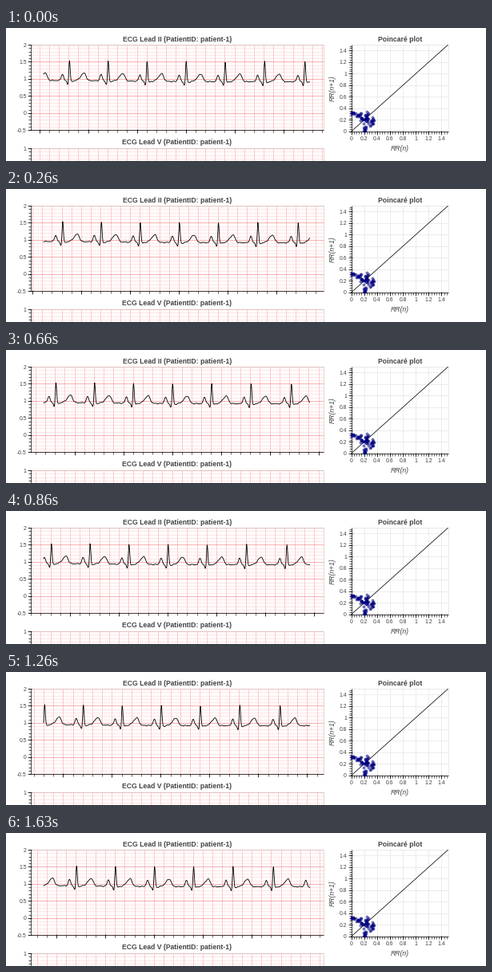
Recreate the animation shown at these times as a matplotlib script. Size 600x167 px, loop 1760 ms.

```python
import matplotlib.pyplot as plt
import numpy as np
from matplotlib.animation import FuncAnimation
from matplotlib.collections import LineCollection

W, H, DPI = 600, 167, 100
LOOP_MS, TICK_MS = 1760, 10
STEP_TIMES = [30, 130, 260, 360, 460, 660, 730, 860,
              1030, 1160, 1260, 1460, 1560, 1630]
STEP_PX = 2.82

LEFT, RIGHT, TOP, BOTTOM = 30.5, 396.5, 21, 128.3
LOWER_TOP = 151
MV = 42.9            # pixels per millivolt
SECOND = 61.0        # pixels per second
GRID_PHASE = 41.5
TRACE_START, TRACE_END = 47, 380
R_PEAKS = [-18.5, 30.5, 79.3, 127.7, 176.3, 225.2, 274, 323.3, 373.7, 423]

PT = 72 / DPI
INK = "#444444"

plt.rcParams["font.family"] = "Liberation Sans"
fig = plt.figure(figsize=(W / DPI, H / DPI), dpi=DPI, facecolor="white")
ax = fig.add_axes([0, 0, 1, 1])
ax.set_xlim(0, W)
ax.set_ylim(H, 0)
ax.axis("off")


def text(x, y, s, px=6.9, **kw):
    kw = {"color": INK, "ha": "center", "va": "baseline", **kw}
    ax.text(x, y, s, fontsize=px * PT, **kw)


def lines(segments, color, width, z=1, alpha=1):
    group = LineCollection(segments, colors=color, linewidths=width * PT,
                           alpha=alpha, zorder=z)
    ax.add_collection(group, autolim=False)
    return group


def hseg(ys, x0, x1):
    return [[(x0, y), (x1, y)] for y in ys]


def vseg(xs, y0, y1):
    return [[(x, y0), (x, y1)] for x in xs]


def title(x, y, s):
    text(x, y, s, 8.62, weight="bold")


# ECG panels
def ecg_panel(top, bottom, high):
    majors = np.arange(top, bottom + 1, MV / 2)
    minors = np.arange(top, bottom + 1, MV / 10)
    lines(hseg(minors, LEFT, RIGHT), "#ff0000", 0.65, alpha=0.12)
    lines(hseg(majors, LEFT, RIGHT), "#ee4444", 0.7, alpha=0.45)
    lines(hseg(minors, LEFT - 2.6, LEFT), "black", 0.65, 3)
    lines(hseg(majors, LEFT - 4, LEFT + 1.3), "black", 0.7, 3)
    lines([[(LEFT, top), (LEFT, bottom)]], "black", 0.7, 3)
    lines([[(LEFT, top), (RIGHT, top)], [(RIGHT, top), (RIGHT, bottom)]],
          "#d8c8c8", 0.7, 2)
    for i, y in enumerate(majors):
        if y < H - 2:
            text(25.8, y + 2.5, f"{high - i / 2:g}", ha="right")


ecg_panel(TOP, BOTTOM, 2)
ecg_panel(LOWER_TOP, LOWER_TOP + MV * 2.5, 1)
lines([[(LEFT, BOTTOM), (RIGHT, BOTTOM)]], "black", 0.7, 3)
title(213.7, 16.6, "ECG Lead II (PatientID: patient-1)")
title(213.7, 145.8, "ECG Lead V (PatientID: patient-1)")

minor_grid = lines([], "#ff0000", 0.5, alpha=0.07)
major_grid = lines([], "#ee4444", 0.65, alpha=0.36)
minor_ticks = lines([], "black", 0.6, 3)
major_ticks = lines([], "black", 0.7, 3)
trace, = ax.plot([], [], color="black", lw=0.85 * PT, zorder=4,
                 solid_joinstyle="round")


def bump(x, centre, rise, fall, height):
    width = np.where(x < centre, rise, fall)
    return height * np.exp(-((x - centre) / width) ** 2 / 2)


def lead_two(x):
    y = 66.6 + 0.8 * np.tanh((x - 150) / 80)
    y = y + 0.3 * np.sin(x * 0.83) + 0.25 * np.sin(x * 1.37 + 1)
    for r in R_PEAKS:
        d = x - r
        y -= bump(d, -8.8, 1.5, 1.4, 8)
        y += bump(d, -2.1, 1.0, 0.8, 5)
        y -= bump(d, 0, 0.75, 0.85, 25.5)
        y += bump(d, 3, 1.5, 2, 1)
        y -= bump(d, 18.5, 4.2, 2.3, 9.5)
    return y


def scrolled(spacing, shift):
    first = np.ceil((LEFT + shift - GRID_PHASE) / spacing)
    last = np.floor((RIGHT + shift - GRID_PHASE) / spacing)
    return GRID_PHASE + np.arange(first, last + 1) * spacing - shift


def grid_segments(xs):
    return vseg(xs, TOP, BOTTOM) + vseg(xs, LOWER_TOP, H)


# Poincaré panel
X0, Y0, UNIT_X, UNIT_Y = 431.5, 130, 80.7, 72.6
X1, Y1 = X0 + 1.5 * UNIT_X, Y0 - 1.5 * UNIT_Y


def poincare_panel():
    major = np.arange(8) * 0.2
    minor = np.arange(38) * 0.04
    mx, my = X0 + major * UNIT_X, Y0 - major * UNIT_Y
    lines(vseg(mx, Y0, Y1) + hseg(my, X0, X1), "#e5e5e5", 0.7)
    lines([[(X0, Y1), (X1, Y1)], [(X1, Y1), (X1, Y0)]], "#e0e0e0", 0.7)
    lines(vseg(X0 + minor * UNIT_X, Y0, Y0 + 2.6)
          + hseg(Y0 - minor * UNIT_Y, X0 - 2.6, X0), "black", 0.6, 3)
    lines(vseg(mx, Y0 - 1.3, Y0 + 4) + hseg(my, X0 - 4, X0 + 1.3),
          "black", 0.7, 3)
    lines([[(X0, Y1), (X0, Y0)], [(X0, Y0), (X1, Y0)]], "black", 0.7, 3)
    lines([[(X0, Y0), (X1, Y1)]], "black", 0.75, 2)
    for v, x, y in zip(major, mx, my):
        text(x, 141.4, f"{v:g}")
        text(426, y + 2.5, f"{v:g}", ha="right")
    title(492.3, 16.6, "Poincaré plot")
    text(492.3, 154, "RR(n)", 8.62, style="italic")
    text(408.5, 76, "RR(n+1)", 8.62, style="italic", rotation=90,
         va="center")


def poincare_points():
    # centre x, centre y, spread x, spread y, count
    clusters = [(434.5, 106, 1.4, 1, 9), (441, 110, 2.2, 1.4, 11),
                (446, 113.5, 2.4, 1.6, 12), (452, 107, 0.7, 1.8, 5),
                (451.5, 114, 1.4, 2.6, 14), (458, 114.5, 1.6, 2.4, 8),
                (455, 120, 1.8, 1.5, 6), (448.5, 126, 1.4, 2.2, 11)]
    rng = np.random.default_rng(4)
    points = np.vstack([rng.normal((x, y), (sx, sy), (n, 2))
                        for x, y, sx, sy, n in clusters])
    points[:, 0] = np.clip(points[:, 0], X0, 460)
    points[:, 1] = np.clip(points[:, 1], 103.5, 129.5)
    ax.scatter(*points.T, s=(3.2 * PT) ** 2, facecolor="navy",
               edgecolor="navy", linewidth=0.6 * PT, alpha=0.5, zorder=4)


poincare_panel()
poincare_points()


def update(frame):
    steps = sum(t <= frame * TICK_MS for t in STEP_TIMES)
    shift = STEP_PX * steps
    fifths = scrolled(SECOND / 5, shift)
    minor_grid.set_segments(grid_segments(scrolled(SECOND / 25, shift)))
    major_grid.set_segments(grid_segments(fifths))
    minor_ticks.set_segments(vseg(fifths, BOTTOM, BOTTOM + 2.2))
    major_ticks.set_segments(vseg(scrolled(SECOND, shift),
                                  BOTTOM - 1.3, BOTTOM + 3.8))
    x = np.arange(TRACE_START, TRACE_END, 0.45)
    trace.set_data(x, lead_two(x + shift))
    return minor_grid, major_grid, minor_ticks, major_ticks, trace


animation = FuncAnimation(fig, update, frames=LOOP_MS // TICK_MS,
                          interval=TICK_MS, repeat=True, repeat_delay=0,
                          blit=False)
plt.show()
```
